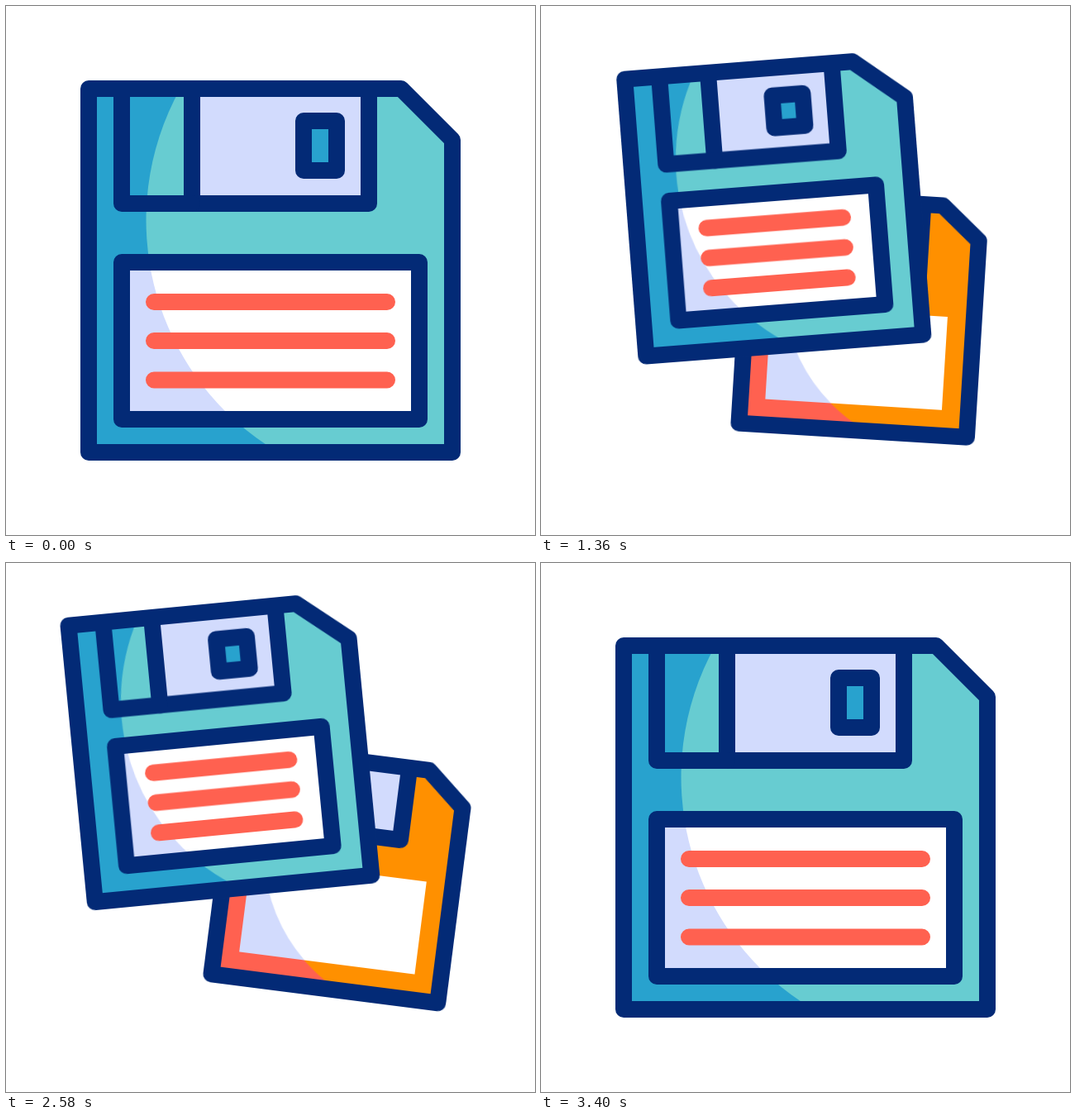
These frames come from a looping animation (640x640 px, 3600 ms). An HTML page without scripts:

```html
<!DOCTYPE html>
<html lang="en">
<head>
<meta charset="utf-8">
<title>Floppy disks</title>
<style>
html, body { margin: 0; width: 100%; height: 100%; overflow: hidden; background: #fff; }
svg { display: block; width: 100vw; height: 100vh; }

.ink { stroke: #032a76; stroke-width: 20; stroke-linejoin: round; stroke-linecap: round; }
.none { fill: none; }
.blue { fill: #28a2ce; }
.teal { fill: #67ccd1; }
.pale { fill: #d2dbfd; }
.white { fill: #fff; }
.coral { fill: #ff6150; }
.orange { fill: #ff9000; }
.line { fill: none; stroke: #ff6150; stroke-width: 20; stroke-linecap: round; }

.front, .front path, .back, .corner, .spark {
  animation: 3600ms cubic-bezier(.333, 0, .667, 1) infinite;
}
.front { animation-name: front; }
.back { animation-name: back; }
.corner { animation-name: corner; }
.spark { stroke-dasharray: 1 2; animation-name: spark; animation-timing-function: linear; }
.front path { d: var(--a); animation-name: morph; }

/* --a: large disk, --b: small disk; the stroke keeps its weight */
@keyframes morph {
  0%, 11.667%, 94.444%, 100% { d: var(--a); }
  34.306%, 77.333% { d: var(--b); }
}
@keyframes front {
  0%, 11.667%, 94.444%, 100% { transform: translate(320px, 320px) rotate(0deg); }
  34.306% { transform: translate(290px, 249px) rotate(0deg); animation-timing-function: cubic-bezier(.4, 0, .85, .85); }
  43.056%, 66.306% { transform: translate(253px, 222.4px) rotate(-20deg); }
  55.36%, 77.333% { transform: translate(265.2px, 231.4px) rotate(10deg); }
}
@keyframes back {
  0%, 11.667%, 94.444%, 100% { transform: translate(320px, 320px) rotate(0deg); }
  34.306% { transform: translate(380.3px, 381.8px) rotate(0deg); animation-timing-function: cubic-bezier(.4, 0, .85, .85); }
  43.056%, 66.306% { transform: translate(405.2px, 348.8px) rotate(16deg); }
  55.36%, 77.333% { transform: translate(400.7px, 407.2px) rotate(-2deg); }
}
@keyframes corner {
  0%, 77.333% { transform: translate(-32.6px, -7.2px); }
  94.444%, 100% { transform: translate(44.4px, 9.8px); }
}
@keyframes spark {
  0%, 82.2% { stroke-dashoffset: 1; visibility: hidden; }
  82.21% { stroke-dashoffset: 1; visibility: visible; }
  84.7%, 86.6% { stroke-dashoffset: 0; visibility: visible; }
  88.6% { stroke-dashoffset: -.95; visibility: visible; }
  88.61%, 100% { stroke-dashoffset: -1; visibility: hidden; }
}
</style>
</head>
<body>
<svg viewBox="0 0 640 640">
  <g class="back">
    <path class="coral" d="M-138-139H92L138-99V139H-138Z"/>
    <path class="orange" d="M-70-139A201 201 0 0 0 17 139H138V-99L92-139Z"/>
    <path class="pale" d="M-108-5H106V108H-108Z"/>
    <path class="white" d="M-92-5A201 201 0 0 0-28.5 108H106V-5Z"/>
    <path class="pale ink" d="M-58-139H68V-51H-58Z"/>
    <path class="none ink" d="M-98-139V-51H-58"/>
    <path class="none ink" d="M-138-139H92L138-99V139H-138Z"/>
  </g>

  <g class="front">
    <path class="blue" style="--a:path('M-220-220H158L220-158V220H-220Z');--b:path('M-168-168H108.3L168-119.8V168H-168Z')"/>
    <path class="teal" style="--a:path('M-109.2-220A327 327 0 0 0 9.3 220H220V-158L158-220Z');--b:path('M-84-168A250.5 250.5 0 0 0 8.6 168H168V-119.8L108.3-168Z')"/>

    <path class="pale ink" style="--a:path('M-95-220H119V-81H-95Z');--b:path('M-67-168H83V-61.6H-67Z')"/>
    <path class="none ink" style="--a:path('M-180-220V-81H-95');--b:path('M-126.1-168V-61.6H-67')"/>
    <path class="blue ink" style="--a:path('M40-181H80V-121H40Z');--b:path('M8.2-134.3H45.2V-95.3H8.2Z')"/>

    <path class="pale" style="--a:path('M-180-10H180V180H-180Z');--b:path('M-125.7-17H125V128H-125.7Z')"/>
    <path class="white" style="--a:path('M-146.5-10A327 327 0 0 0-44.5 180H180V-10Z');--b:path('M-112.8-17A250.5 250.5 0 0 0-42.6 128H125V-17Z')"/>
    <path class="none ink" style="--a:path('M-180-10H180V180H-180Z');--b:path('M-125.7-17H125V128H-125.7Z')"/>
    <path class="line" style="--a:path('M-141 38H141M-141 85H141M-141 132.5H141');--b:path('M-83 19.3H82M-83 55.5H82M-83 92.1H82')"/>

    <path class="none ink" style="--a:path('M-220-220H158L220-158V220H-220Z');--b:path('M-168-168H108.3L168-119.8V168H-168Z')"/>
  </g>

  <g class="corner">
    <path class="line spark" pathLength="1" d="M507 97L523.5 55.5"/>
    <path class="line spark" pathLength="1" d="M533 121.5L570.5 99.5"/>
  </g>
</svg>
</body>
</html>
```
